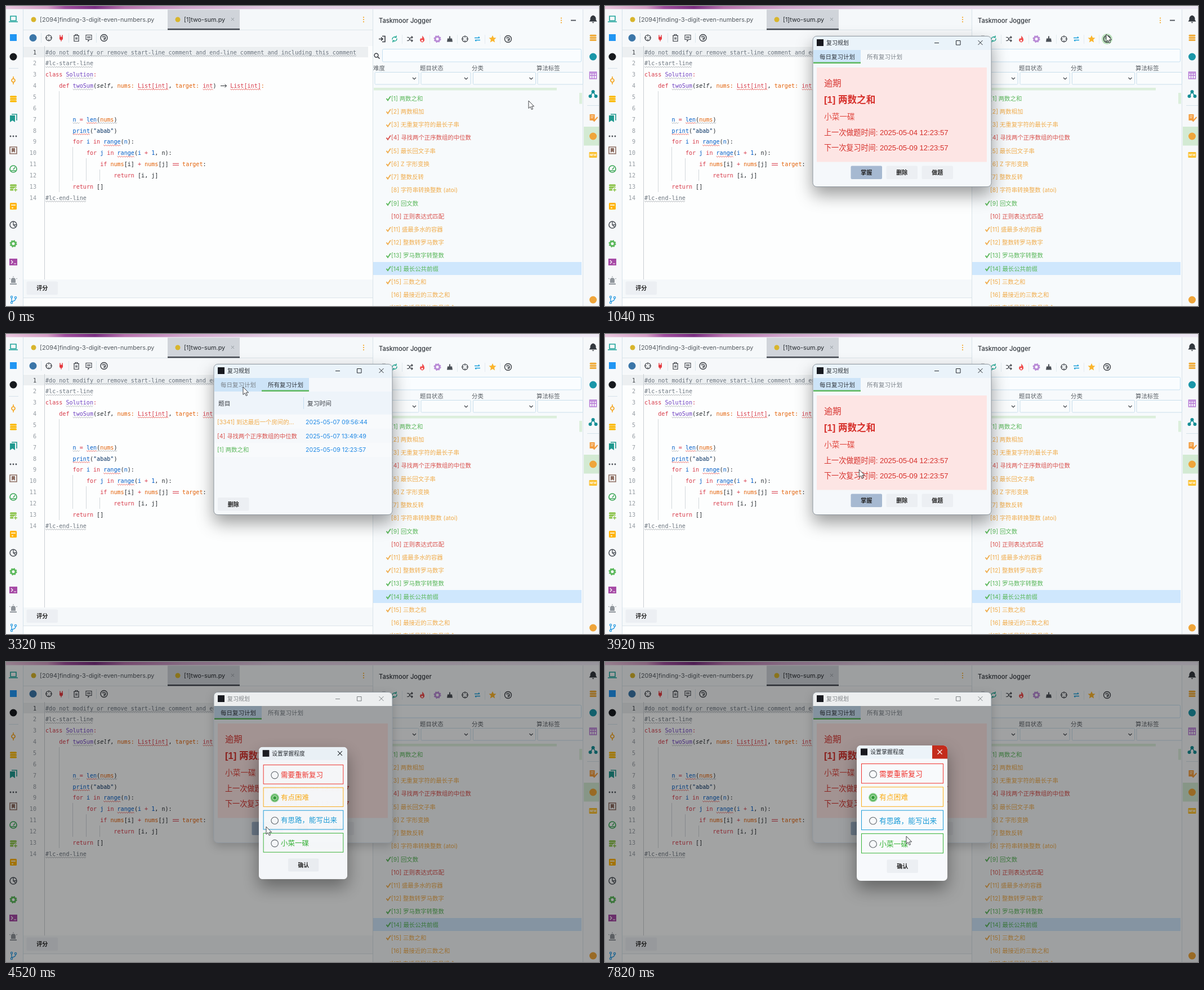
These frames come from a looping animation (1053 px wide and 532 px high, 8 s). An HTML page:

```html
<!DOCTYPE html>
<html lang="zh-CN">
<head>
<meta charset="utf-8">
<title>Review planner</title>
<style>
html, body { margin: 0; width: 100%; height: 100%; overflow: hidden; background: #fff; }
svg { display: block; width: 1053px; height: 532px; }
text { font-family: Inter, 'Noto Sans CJK SC', 'Noto Sans CJK', sans-serif; white-space: pre; }
.mono { font-family: 'DejaVu Sans Mono', monospace; font-size: 10.095px; }
.card { font-family: 'Liberation Sans', 'Noto Sans CJK SC', 'Noto Sans CJK', sans-serif; }
.window { filter: drop-shadow(0 14px 15px rgba(0, 0, 0, .38)); }
.window.idle { filter: drop-shadow(0 6px 8px rgba(0, 0, 0, .18)); }
</style>
</head>
<body>
<svg id="stage" viewBox="0 0 1053 532" xmlns="http://www.w3.org/2000/svg"></svg>
<script>
const DARK = '#3b3f45', GREEN = '#5cb85c', ORANGE = '#f0ad4e', RED = '#d9534f', BLUE = '#1e88e5';
const DIM = .36;

// Drawing helpers; text is placed by its vertical centre.
const rect = (x, y, w, h, fill, more = '') =>
  `<rect x="${x}" y="${y}" width="${w}" height="${h}" fill="${fill}" ${more}/>`;
const path = (d, color, width = 1, more = '') =>
  `<path d="${d}" fill="none" stroke="${color}" stroke-width="${width}" ${more}/>`;
const solid = (d, fill) => `<path d="${d}" fill="${fill}"/>`;
const dot = (x, y, r, fill, more = '') => `<circle cx="${x}" cy="${y}" r="${r}" fill="${fill}" ${more}/>`;
const ring = (x, y, r, color, width = 1.2, more = '') =>
  dot(x, y, r, 'none', `stroke="${color}" stroke-width="${width}" ${more}`);
const text = (x, y, s, size, fill, more = '') =>
  `<text x="${x}" y="${y + size * .36}" font-size="${size}" fill="${fill}" ${more}>${s}</text>`;
const at = (x, y, s) => `<g transform="translate(${x} ${y})">${s}</g>`;
const group = (id, s, more = '') => `<g id="${id}" ${more}>${s}</g>`;
const button = (x, y, label, fill = '#eceff3') =>
  rect(x, y, 55.5, 23.5, fill, 'rx="2"') +
  text(x + 27.7, y + 12, label, 10, '#222', 'font-weight="700" text-anchor="middle"');

// Icons, centred on 0,0.
const icon = {
  gear: c => ring(0, 0, 4, c, 3) + ring(0, 0, 5.6, c, 2, 'stroke-dasharray="2.2 2.2"'),
  target: c => ring(0, 0, 5, c) + path('M0-6V-2M0 6V2M-6 0H-2M6 0H2', c),
  history: c => ring(0, 0, 6, c, 1.4) + path('M-3-1A3 3 0 1 1-1 3M0-1V1H2', c, 1.2),
  db: c => [-4, 0, 4].map(y => rect(-6, y - 1.8, 12, 3.4, c, 'rx="1.5"')).join(''),
  kebab: c => [-4, 0, 4].map(y => dot(0, y, 1.1, c)).join(''),
  laptop: c => path('M-5-5H5V3H-5ZM-8 5H8', c, 1.6),
  commit: c => ring(0, 0, 3, c, 1.7) + path('M0-7V-3M0 3V7', c, 1.6),
  books: c => solid('M-6-4H3V8L-1.5 5L-6 8Z', c) + path('M-3-6H6V5', c, 1.6),
  dots: c => [-5, 0, 5].map(x => dot(x, 0, 1.4, c)).join(''),
  mark: c => path('M-6-6H6V6H-6Z', c, 1.6) + solid('M-3-4H3V4L0 2L-3 4Z', c),
  gauge: c => ring(0, 0, 6, c, 1.7) + path('M-4 3H4M0 1L3-3', c, 1.5),
  dbPlus: c => icon.db(c) + path('M4 0V8M0 4H8', '#f6f8fa', 4) + path('M4 1V7M1 4H7', c, 1.5),
  box: c => rect(-6, -6, 12, 12, c, 'rx="1.5"') + path('M-4-2H4M-3 3H0', '#fff', 1.3),
  pie: c => ring(0, 0, 6, c, 1.5) + path('M0-6V0H6M0 0L4 4', c, 1.3),
  term: c => rect(-7, -6, 14, 12, c) + path('M-4-3L-1 0L-4 3M1 3H5', '#fff', 1.2),
  siren: c => solid('M-4 4V-1A4 4 0 0 1 4-1V4ZM-6 5H6V7H-6Z', c) + path('M0-8V-6M-7-4L-5-3M7-4L5-3', c),
  branch: c => path('M-3-4V4M4-2Q4 2-3 3', c, 1.4) + ring(-3, -5, 1.7, c) + ring(-3, 5, 1.7, c) + ring(4, -4, 1.7, c),
  bell: c => solid('M-7 4L-5 1V-2Q-4-6 0-7Q4-6 5-2V1L7 4ZM-2 5H2L0 7Z', c),
  table: c => path('M-6-6H6V6H-6ZM-6-4H6M-6 0H6M-2-5V6M2-5V6', c, 1.5),
  net: c => path('M-5 4L0-4L5 4', c, 1.5) + dot(0, -4, 3, c) + dot(-5, 4, 3, c) + dot(5, 4, 3, c),
  list: c => rect(-6, -6, 9, 11, c) + path('M-4-3H1M-4 0H0', '#fff') + path('M-1 3L2 6L8-1', c, 2),
  tag: c => rect(-7, -5, 14, 10, c, 'rx="1"') + text(0, 0, 'NEW', 5, '#fff', 'font-weight="700" text-anchor="middle"'),
  plug: c => solid('M-3-2H3V1Q3 4 0 4Q-3 4-3 1Z', c) + path('M-2-5V-2M2-5V-2M0 4V6', c, 1.5),
  trash: c => path('M-5-4H5M-2-4V-6H2V-4M-4-4V6H4V-4M-1-1V3M1-1V3', c, 1.2),
  chat: c => path('M-5-5H5V3H1L-1 6V3H-5ZM-3-2H3M-3 0H3', c, 1.1),
  login: c => path('M-6 0H1M-2-3L1 0L-2 3M0-5H5V5H0', c, 1.6),
  refresh: c => path('M-4 1A4.4 4.4 0 0 1 3-3M3-6V-3H0M4-1A4.4 4.4 0 0 1-3 3M-3 6V3H0', c, 1.3),
  shuffle: c => path('M-5-3H-2L2 3H5M-5 3H-2L2-3H5M3-5L5-3L3-1M3 1L5 3L3 5', c, 1.2),
  flame: c => solid('M0-6Q5-1 4 3Q2 6 0 6Q-4 5-4 1L-2-2L-1 0Q1-3 0-6Z', c) + dot(0, 3, 1.5, '#fff'),
  broom: c => solid('M-1-5H1V-1H4L5 5H-5L-4-1H-1Z', c),
  swap: c => path('M-5-2H4M2-4L4-2M5 2H-4M-2 4L-4 2', c, 1.3),
  star: c => solid('M0-6.5L2-2.3L6.5-2L3 1.2L4.2 6L0 3.5L-4.2 6L-3 1.2L-6.5-2L-2-2.3Z', c),
  glass: c => ring(-1, -1, 3.4, c, 1.5) + path('M1.5 1.5L5 5', c, 1.7),
  disc: c => dot(0, 0, 6.5, c),
  square: c => rect(-6, -6, 12, 12, c)
};
const put = (x, y, name, color) => at(x, y, icon[name](color));
const column = (x, rows) => rows.map(([y, n, c]) => put(x, y, n, c)).join('');
const row = (y, cells) => cells.map(([x, n, c]) => put(x, y, n, c)).join('');

// Code editor.
const CHAR = 6.077, lineY = n => 82 + (n - 1) * 19.87;
const KEY = '#d73a49', NAME = '#005cc5', ARG = '#e36209', FN = '#6f42c1', INK = '#24292e', NOTE = '#6a737d', STR = '#032f62';
const code = (n, col, ...parts) =>
  `<text class="mono" x="${70 + col * CHAR}" y="${lineY(n) + 3.5}">` + parts.map(([s, c, more = '']) =>
    `<tspan fill="${c}" ${more}>${s}</tspan>`).join('') + '</text>';
const wave = (n, col, len, color) => {
  let d = '';
  for (let i = 0; i * 2 <= len * CHAR; i++) d += `${i ? 'L' : 'M'}${70 + col * CHAR + i * 2} ${lineY(n) + (i % 2 ? 7.2 : 5.4)}`;
  return path(d, color, .8);
};
function editor() {
  const gray = '#9da3a8', red = '#e5433d';
  let s = rect(30, 43, 621, 489, '#fdfefe') + rect(30, 43, 621, 28, '#f6f8fa') + rect(30, 72, 613, 19, '#eceff1') +
    path('M68.5 71V485', '#c9ced3') + path('M94.5 151V330M118.5 250V310M142.5 270V310M166.5 290V310', '#d3d8dc');
  for (let n = 1; n < 15; n++)
    s += `<text class="mono" x="54" y="${lineY(n) + 3.5}" text-anchor="end" fill="${n == 1 ? DARK : '#959ca3'}">${n}</text>`;
  s += code(1, 0, ['#do not modify or remove start-line comment and end-line comment and including this comment', NOTE]) +
    code(2, 0, ['#lc-start-line', NOTE]) +
    code(3, 0, ['class ', KEY], ['Solution', FN], [':', KEY]) +
    code(4, 4, ['def ', KEY], ['twoSum', FN], ['(', INK], ['self', INK, 'font-style="italic"'], [', ', INK], ['nums: ', ARG],
      ['List[int]', KEY], [', ', INK], ['target: ', ARG], ['int', KEY], [')', INK]) +
    code(4, 54, ['List[int]', KEY], [':', ARG]) +
    code(7, 8, ['n', NAME], [' = ', KEY], ['len', NAME], ['(', INK], ['nums', ARG], [')', INK]) +
    code(8, 8, ['print', NAME], ['(', INK], ['"abab"', STR], [')', INK]) +
    code(9, 8, ['for ', KEY], ['i ', NAME], ['in ', KEY], ['range', NAME], ['(', INK], ['n', NAME], ['):', INK]) +
    code(10, 12, ['for ', KEY], ['j ', NAME], ['in ', KEY], ['range', NAME], ['(', INK], ['i', NAME], [' + ', KEY], ['1', NAME], [', n):', INK]) +
    code(11, 16, ['if ', KEY], ['nums', ARG], ['[i] ', INK], ['+ ', KEY], ['nums', ARG], ['[j]', INK]) +
    code(11, 40, ['target', ARG], [':', INK]) +
    code(12, 20, ['return ', KEY], ['[i, j]', INK]) + code(13, 8, ['return ', KEY], ['[]', INK]) + code(14, 0, ['#lc-end-line', NOTE]) +
    path('M381 141.6H391.5M388.5 138.6L391.5 141.6L388.5 144.6', INK) + path('M296 279.3H307M296 282.3H307', KEY);
  for (const [n, c, len] of [[1, 0, 91], [2, 0, 14], [3, 6, 8], [4, 8, 6], [7, 8, 2], [7, 15, 6], [14, 0, 12]]) s += wave(n, c, len, gray);
  for (const [n, c, len] of [[4, 27, 9], [4, 46, 3], [4, 54, 9], [7, 12, 3], [8, 8, 5], [9, 17, 5], [10, 21, 5]]) s += wave(n, c, len, red);
  s += path('M62.5 48V65M111.5 48V65M160.5 48V65', '#dbe6ec') +
    row(56.5, [[48, 'disc', '#3b76a8'], [76, 'target', DARK], [98, 'plug', '#e5393f'], [125, 'trash', DARK], [147, 'chat', DARK], [174, 'history', DARK]]);
  return s + rect(30, 485, 621, 33, '#f5f8fa') + button(36.5, 488.5, '评分') + path('M30 517.5H651', '#dde5ea');
}

function tabs() {
  return rect(30, 6, 621, 37, '#f5f8fa') + rect(287, 6.5, 128, 36, '#d0d4da') + rect(287, 40, 128, 2.5, '#454a52') +
    path('M30 42.5H287M415 42.5H651', '#dce4e9') +
    dot(49, 24, 4.5, '#d8b52c') + text(60, 24.5, '[2094]finding-3-digit-even-numbers.py', 10.8, '#555b61') +
    dot(305, 24, 4.5, '#d8b52c') + text(316, 24.5, '[1]two-sum.py', 10.8, '#24292e') +
    path('M400 21L405 26M405 21L400 26', '#8b9197', .9) + put(635, 24, 'kebab', '#f5a623');
}

// Problem list: colour, solved, title.
const problems = [
  [GREEN, 1, '两数之和'], [ORANGE, 1, '两数相加'], [ORANGE, 1, '无重复字符的最长子串'], [RED, 1, '寻找两个正序数组的中位数'],
  [ORANGE, 1, '最长回文子串'], [ORANGE, 1, 'Z 字形变换'], [ORANGE, 1, '整数反转'], [ORANGE, 0, '字符串转换整数 (atoi)'],
  [GREEN, 1, '回文数'], [RED, 0, '正则表达式匹配'], [ORANGE, 1, '盛最多水的容器'], [ORANGE, 1, '整数转罗马数字'],
  [GREEN, 1, '罗马数字转整数'], [GREEN, 1, '最长公共前缀'], [ORANGE, 1, '三数之和'], [ORANGE, 0, '最接近的三数之和'], [ORANGE, 1, '电话号码的字母组合']];
function panel() {
  let s = rect(651, 6, 374, 526, '#f7fafc') + path('M651.5 6V532M1024.5 6V532', '#d9e3e9') +
    text(662, 26, 'Taskmoor Jogger', 11.2, '#33383e', 'font-weight="500"') +
    group('header', put(986, 25.5, 'kebab', '#f5a623') + path('M1003 25.5H1012', '#4b5057', 1.8)) +
    path('M703.5 51V67M752.5 51V67M801.5 51V67M850.5 51V67M877.5 51V67', '#e3ebf0') +
    group('hover', dot(891.5, 58.5, 9.5, '#b9dfb9')) +
    row(58.5, [[668, 'login', DARK], [690, 'refresh', '#1ba58f'], [717, 'shuffle', DARK], [739, 'flame', '#ef4b4b'], [766, 'gear', '#b98ad6'],
      [788, 'broom', '#4b5057'], [815, 'target', DARK], [837, 'swap', '#1a9fd9'], [864, 'star', '#fbb52d'], [891.5, 'history', DARK]]) +
    put(658.5, 88.5, 'glass', DARK) + rect(668.5, 76.5, 353, 22.5, '#fafdff', 'rx="2" stroke="#c6e0f1"');
  for (const [x, label] of [[652, '难度'], [735, '题目状态'], [827, '分类'], [942, '算法标签']]) s += text(x, 110, label, 10.4, '#5b6167');
  for (const [x, w] of [[655, 78], [737, 88], [829.5, 111], [944, 80.5]])
    s += rect(x, 117.5, w, 21.5, '#fafcfd', 'rx="1.5" stroke="#c9dfec"') +
      (x < 944 ? path(`M${x + w - 11} 127L${x + w - 8} 130L${x + w - 5} 127`, DARK, 1.2) : '');
  s += rect(653, 145, 325, 4.5, '#dcefdc') + rect(1018, 154, 5, 19.5, '#dcefdc') + rect(652, 454, 370, 23, '#cfe7fd');
  problems.forEach(([c, done, title], i) => {
    const y = 164 + i * 23.22;
    s += text(684, y, `[${i + 1}] ${title}`, 10.4, c) + (done ? path(`M675.5 ${y}L678 ${y + 3.3}L683 ${y - 4}`, c, 1.9) : '');
  });
  return s;
}

function bars() {
  return rect(0, 6, 30, 526, '#f6f8fa') + rect(1025, 6, 28, 526, '#f6f8fa') + rect(1026, 214, 27, 33.5, '#d3ead3') +
    path('M30.5 6V532M5 110.5H22M1032 176.5H1053', '#d5e2ea') +
    column(13, [[23, 'laptop', '#1fa39a'], [56, 'square', '#2196f3'], [90, 'disc', '#16191d'], [132, 'commit', '#f5a623'], [165, 'db', '#fbb800'],
      [198, 'books', '#20998f'], [231, 'dots', '#4b5057'], [256, 'mark', '#8d6e63'], [289, 'gauge', '#3fa85a'], [322, 'dbPlus', '#8bc34a'],
      [355, 'box', '#ffb300'], [388, 'pie', '#4b5057'], [421.5, 'gear', '#5cb85c'], [454, 'term', '#a64aa6'], [487, 'siren', '#8f959b'], [521, 'branch', '#2a9be0']]) +
    column(1042.5, [[23.5, 'bell', '#33383e'], [56.5, 'db', '#f0ad3e'], [90, 'disc', '#1a96a8'], [123, 'table', '#b77ad6'], [156, 'net', '#168f96'],
      [198, 'list', '#f39c3d'], [231, 'disc', '#efa53a'], [264, 'tag', '#fbc02d'], [521, 'disc', '#efa53a']]);
}

function planner() {
  const red = '#d6302b', when = '#e04a42';
  const daily = rect(376, 109, 302, 167.5, '#fde5e4') +
    text(389, 136, '逾期', 15.3, red, 'class="card" font-weight="500"') +
    text(389, 166.5, '[1] 两数之和', 16.6, red, 'class="card" font-weight="700"') +
    text(389, 196.5, '小菜一碟', 13.7, when, 'class="card"') +
    text(389, 224, '上一次做题时间: 2025-05-04 12:23:57', 13.1, red, 'class="card"') +
    text(389, 251.5, '下一次复习时间: 2025-05-09 12:23:57', 13.1, red, 'class="card"') +
    button(436.5, 283.5, '掌握', '#a6b9d1') + button(499.5, 283.5, '删除') + button(562.5, 283.5, '做题');
  const all = rect(370, 102, 316, 40.5, '#eef4fa') + path('M528.5 112V133', '#c3dcef') +
    text(377, 123, '题目', 10.7, DARK) + text(535, 123, '复习时间', 10.7, DARK) +
    rect(370, 143, 316, 25, '#f8fafc') + rect(370, 193, 316, 25, '#f8fafc') +
    [[156, ORANGE, '[3341] 到达最后一个房间的...', '07 09:56:44'], [181, RED, '[4] 寻找两个正序数组的中位数', '07 13:49:49'],
      [205.5, GREEN, '[1] 两数之和', '09 12:23:57']].map(([y, c, title, day]) =>
      text(375, y, title, 10.4, c) + text(532, y, '2025-05-' + day, 10.6, BLUE)).join('') + button(376, 290, '删除');
  return rect(369, 53.5, 317, 267, '#f5f8fb') +
    `<rect id="bar" x="369" y="53.5" width="317" height="24.5"/>` + put(382, 65, 'square', '#17191f') +
    group('caption', text(393, 65, '复习规划', 10, '#24292e') +
      path('M585 65.5H593M623.5 61.5H631V69H623.5ZM662.5 61L670.5 69M670.5 61L662.5 69', '#24292e')) +
    rect(370, 78, 316, 24, '#f5f8fb') +
    group('tint0', rect(370, 78, 84, 24, '#cde4f8')) + group('tint1', rect(454, 78, 84, 24, '#cde4f8')) +
    group('line0', rect(370, 99.5, 84, 2.5, GREEN)) + group('line1', rect(454, 99.5, 84, 2.5, GREEN)) +
    group('name0', text(381, 90, '每日复习计划', 10.5, 'currentColor')) + group('name1', text(465, 90, '所有复习计划', 10.5, 'currentColor')) +
    group('page0', daily) + group('page1', all) + group('shade', rect(369, 78, 317, 243, '#000', `opacity="${DIM}"`));
}

function levels() {
  const options = [['#f0312b', '需要重新复习'], ['#fbad18', '有点困难'], ['#1a9bd7', '有思路，能写出来'], ['#36b336', '小菜一碟']];
  return rect(447, 148, 161, 240, '#f7f9fc') + rect(447, 148, 161, 23.5, '#ecf3f9') +
    put(460, 159.5, 'square', '#17191f') + text(471, 159.5, '设置掌握程度', 10, '#24292e') +
    group('danger', rect(581, 148, 27, 23.5, '#c42b1c')) +
    group('cross', path('M590.5 155.5L598.5 163.5M598.5 155.5L590.5 163.5', 'currentColor', 1.1)) +
    options.map(([c, label], i) => {
      const y = 180.5 + i * 41.3;
      return rect(455.5, y, 145, 34.5, '#f8fafc', `stroke="${c}"`) + text(487, y + 18, label, 12.8, c, 'font-weight="500"') +
        (i == 1 ? dot(476, y + 18.5, 8, '#9bd49b') + ring(476, y + 18.5, 5.7, '#4caf50', 1.5) + dot(476, y + 18.5, 2.7, '#2f9a38')
          : ring(476, y + 18.5, 6.4, '#5f656b', 1.1));
    }).join('') + button(500.5, 350.5, '确认');
}

const stripe = [[0, '#e8c5dc'], [.07, '#d39cc4'], [.1, '#a04d9d'], [.15, '#7b2f82'], [.2, '#b772ad'], [.3, '#cfa3ca'], [.45, '#e2cbe2'], [1, '#eee8f4']];
const clip = (id, x, y, w, h) => `<clipPath id="${id}">${rect(x, y, w, h, '#000', 'rx="7"')}</clipPath>`;
const framed = (id, box, s, color) => group(id, `<g clip-path="url(#${id}Clip)">${s}</g>` +
  (color ? rect(...box, 'none', `rx="7" stroke="${color}"`) : ''), 'class="window"');
const planBox = [369, 53.5, 317, 267], popBox = [447, 148, 161, 240];
document.getElementById('stage').innerHTML =
  `<defs><linearGradient id="stripe">${stripe.map(([o, c]) => `<stop offset="${o}" stop-color="${c}"/>`).join('')}</linearGradient>` +
  clip('planClip', ...planBox) + clip('popClip', ...popBox) + '</defs>' +
  rect(0, 0, 1053, 532, '#f6f8fa') + rect(0, 0, 1053, 5.5, 'url(#stripe)') +
  tabs() + editor() + panel() + bars() + group('dim', rect(0, 0, 1053, 532, '#000', `opacity="${DIM}"`)) +
  framed('plan', planBox, planner(), '#8f979e') + framed('pop', popBox, levels()) +
  group('cursor', '<path d="M0 0V13.5L3.2 10.6L5.4 15.6L7.5 14.7L5.4 9.9H9.6Z" fill="#fff" stroke="#2b2e33" stroke-width=".9" stroke-linejoin="round"/>');

// Pointer moves: first step, last step, number of steps, destination.
const moves = [[70, 640, 7, 890, 50], [1130, 1740, 7, 504, 104], [1930, 2030, 2, 502, 95], [2820, 3320, 6, 421, 94],
  [3620, 4120, 6, 462, 292], [5020, 5520, 6, 590, 163], [6730, 7330, 7, 534, 316], [7730, 7820, 2, 535, 309]];
function pointer(t) {
  let x = 928, y = 168;
  for (const [start, end, steps, toX, toY] of moves) {
    if (t < start) break;
    const k = Math.floor((t - start) / (end - start) * (steps - 1) + 1e-6) + 1;
    const p = Math.min(1, k / steps), e = p * p * (3 - 2 * p);
    x += (toX - x) * e;
    y += (toY - y) * e;
  }
  return [x, y];
}

const $ = id => document.getElementById(id);
const show = (id, on) => $(id).style.display = on ? '' : 'none';
const pick = (t, table) => table.reduce((v, [from, value]) => t >= from ? value : v, 0);
const zoom = (id, cx, cy, k, opacity) => {
  $(id).setAttribute('transform', `translate(${cx} ${cy}) scale(${k}) translate(${-cx} ${-cy})`);
  $(id).setAttribute('opacity', opacity);
};

function render(t) {
  const [x, y] = pointer(t), open = t >= 740, asleep = t >= 4420, modal = t >= 4520, closing = t >= 5520;
  const page = t >= 2330 && t < 3520 ? 1 : 0;
  const over = open && !asleep && y > 78 && y < 106 ? (x >= 370 && x < 454 ? 0 : x >= 454 && x < 538 ? 1 : -1) : -1;
  $('cursor').setAttribute('transform', `translate(${x} ${y})`);
  show('header', t < 1740);
  show('hover', Math.abs(x - 891) < 14 && y < 70);
  show('plan', open);
  zoom('plan', 527.5, 187, pick(t, [[0, .95], [840, .99], [930, 1]]), pick(t, [[0, .5], [840, .95], [930, 1]]));
  for (const i of [0, 1]) {
    show('tint' + i, page == i || over == i);
    show('line' + i, page == i);
    show('page' + i, page == i);
    $('name' + i).style.color = page == i ? '#33383e' : '#7c838a';
  }
  $('plan').classList.toggle('idle', asleep);
  $('bar').setAttribute('fill', modal ? '#eceeef' : asleep ? '#e4edf3' : '#eaf3fa');
  $('caption').setAttribute('opacity', asleep ? .55 : 1);
  show('shade', asleep);
  show('dim', modal);
  show('pop', modal);
  zoom('pop', 527.5, 268, pick(t, [[0, .977], [4620, .993], [4720, 1]]), pick(t, [[0, .97], [4620, 1]]));
  show('danger', closing);
  $('cross').style.color = closing ? '#fff' : '#24292e';
}

const began = performance.now();
(function tick() {
  render((performance.now() - began) % 8000);
  requestAnimationFrame(tick);
})();
</script>
</body>
</html>
```
